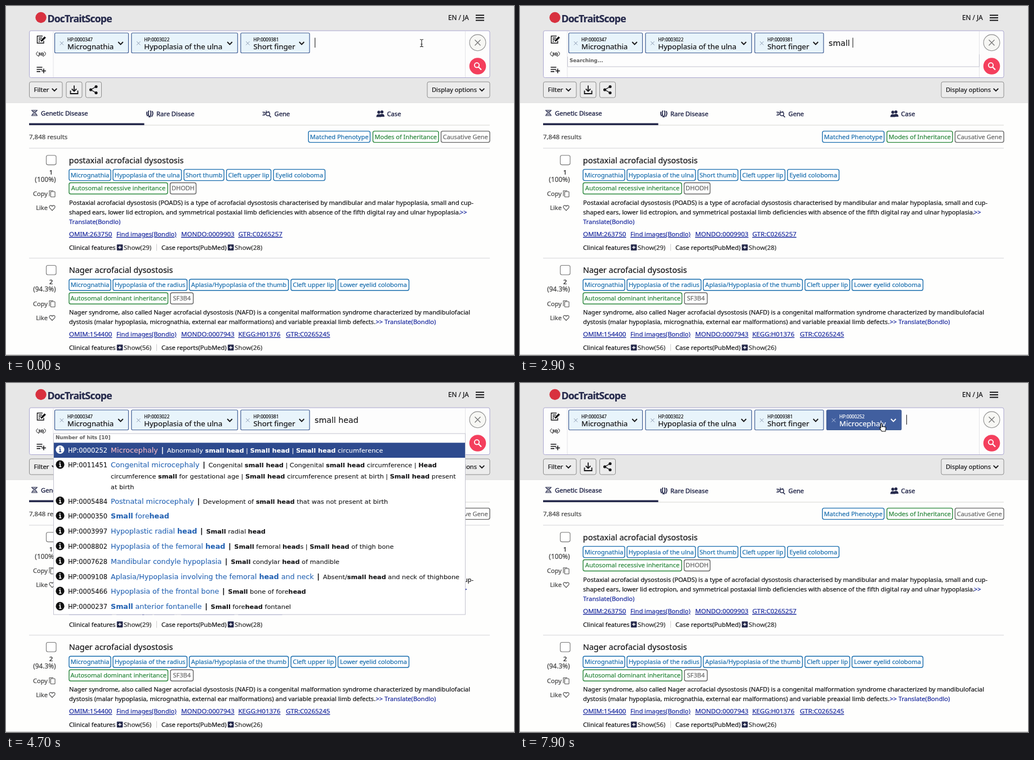
These frames come from a looping animation (902x621 px, 8 s). An HTML page:

```html
<!DOCTYPE html>
<html lang="en">
<head>
<meta charset="utf-8">
<title>Phenotype search</title>
<style>
  html, body { margin: 0; width: 100%; height: 100%; overflow: hidden; background: #fefefd; }
  svg { display: block; width: 100vw; height: 100vh; }
  text { font-family: "Noto Sans", sans-serif; white-space: pre; stroke-width: .22; }
  .v { font-family: "DejaVu Sans", Verdana, sans-serif; stroke-width: .1; }
  .b { font-weight: 700; }
  .m { stroke-width: .42; }
</style>
</head>
<body>
<svg id="stage" viewBox="0 0 902 621"></svg>
<script>
const INK = '#161618', NAVY = '#262a4c', LINK = '#1b2a9e';
const BLUE = '#1a6eae', GREEN = '#28863a', GRAY = '#666';

const text = (x, y, s, size = 11.07, fill = INK, extra = '') =>
  `<text x="${x}" y="${y}" font-size="${size}" fill="${fill}" stroke="${fill}" ${extra}>${s}</text>`;
const box = (x, y, x2, y2, fill, stroke = 'none', r = 0, sw = 1) =>
  `<rect x="${x}" y="${y}" width="${x2 - x}" height="${y2 - y}" rx="${r}" fill="${fill}" stroke="${stroke}" stroke-width="${sw}"/>`;
const line = (d, stroke = INK, sw = 1.5, fill = 'none') =>
  `<path d="${d}" fill="${fill}" stroke="${stroke}" stroke-width="${sw}"/>`;
const disc = (x, y, r, fill, stroke = 'none', sw = 1) =>
  `<circle cx="${x}" cy="${y}" r="${r}" fill="${fill}" stroke="${stroke}" stroke-width="${sw}"/>`;
const chevron = (x, y, c = INK) => line(`M${x - 4.3} ${y - 2.2}l4.3 4.3 4.3-4.3`, c, 1.9);
const cross = (x, y, r, c, sw = 1) =>
  line(`M${x - r} ${y - r}l${2 * r} ${2 * r}m0 ${-2 * r}l${-2 * r} ${2 * r}`, c, sw);
const group = (id, body) => `<g id="${id}">${body}</g>`;

function chip(x, x2, code, name, hot) {
  const ink = hot ? '#fff' : INK;
  return box(x, 48, x2, 83.5, hot ? '#415f9f' : '#e8f4fb', '#3f5d94', 2, 1.2) +
    cross(x + 12.5, 66.3, 3.2, hot ? '#b9c6e2' : '#8b9bb3') +
    text(x + 22.5, 62.8, code, 8, ink) +
    text(x + 22.5, 76.6, name, 13.2, ink) +
    chevron(x2 - 14, 66.2, ink);
}

function tag(s, x, x2, cy, color) {
  return box(x + .5, cy - 10, x2 - .5, cy + 10, '#fff', color, 3, 1.4) +
    text((x + x2) / 2, cy + 3.9, s, 11.02, color, 'text-anchor="middle"');
}

function header() {
  return box(0, 0, 902, 172, '#e7e7e7') + line('M0 172H902', '#dcdcdc', 1) +
    disc(62, 20.5, 9.7, '#d8313f') +
    text(73.5, 29, 'DocTraitScope', 17.6, NAVY, 'class="b" letter-spacing="-.8"') +
    text(785, 25, 'EN / JA', 11.8) +
    line('M834 16.5h15M834 21h15M834 25.5h15', INK, 1.9) +
    box(41.5, 44, 859, 127.5, '#fdfdfd', '#aaa6cf', 3) +
    line('M84 45V127M815.5 45V127', '#e3e3e8', 1) +
    // side tools
    line('M65 53.5H55.5V66H67V62M58 57h6M58 60h4M58 63h2', INK, 1.4) +
    line('M62 63l.6-2.4 6-6 1.8 1.8-6 6z', INK, 1, INK) +
    text(62.3, 87.8, '3D', 7.6, INK, 'class="b" text-anchor="middle"') +
    line('M57 81.5C52 83 53 88 59 89.6M67.5 81.5C72 83 71 88 65 89.6', INK, 1) +
    line('M54.5 109h10M54.5 112.8h10M54.5 116.6h6.5M67 111.5v8M63 115.5h8', INK, 1.6) +
    // clear and search
    disc(837.5, 65.3, 14.4, '#f7f7f4', '#8c8c8c', 1.1) + cross(837.5, 65.3, 5, '#777', 1.3) +
    disc(837.5, 107, 14.8, '#f43f5d') + disc(836, 105.3, 4.2, 'none', '#fff', 1.8) +
    line('M839 108.5l5 5', '#fff', 2.2) +
    // toolbar
    [[41.5, 100], [107, 135], [141.5, 169.5], [748, 859]]
      .map(([a, b]) => box(a, 135, b, 163, '#ececec', '#8d8d8d', 3)).join('') +
    text(49.5, 153, 'Filter', 11.4) + chevron(86, 149) +
    line('M114.5 150.5v5.5h13v-5.5M121 141.5v9M116.8 147.5l4.2 4.3 4.2-4.3', INK, 1.8) +
    line('M160 143.5l-9.5 5.5 9.5 5.5', INK, 1.4) +
    disc(160, 143.5, 2.6, INK) + disc(150.5, 149, 2.6, INK) + disc(160, 154.5, 2.6, INK) +
    text(756, 153, 'Display options', 11.1) + chevron(845, 149);
}

function tabs() {
  const label = (x, y, s) => text(x, y, s, 11.2, NAVY, 'class="m"');
  const person = (x, y, c) => disc(x, y - 3, 2.7, c) +
    line(`M${x - 4.5} ${y + 5.5}q0-5 4.5-5t4.5 5z`, 'none', 0, c);
  return line('M41 212H859', '#d6d6d2', 1) + box(41, 208.5, 245.5, 212, NAVY) +
    line('M46 185q0 3 4.5 5t4.5 5.5M55 185q0 3-4.5 5t-4.5 5.5M45 185.5h11M45 195h11M47.5 187.5h6M47.5 193h6', NAVY, 1.1) +
    label(62, 194.5, 'Genetic Disease') +
    line('M250.5 188q-1.5 4 1 8M253.5 186q-2 6 1 12M256.5 186q2 6-1 12M259.5 187q3 5-1 10', NAVY, 1.8) +
    label(267, 196, 'Rare Disease') +
    line('M455 189q4-1 7 2t5-4M455 194q4 1 6-2t1-6M458 188v7', NAVY, 1.2) +
    disc(465, 192, 3.3, '#fff', NAVY, 1.4) + line('M467 194.5l3.5 3.5', NAVY, 1.6) +
    label(476.5, 196, 'Gene') +
    person(667.5, 191.5, NAVY) + person(662, 192, NAVY) + label(676.5, 196, 'Case') +
    text(41, 236.6, '7,848 results', 11.45, '#444') +
    tag('Matched Phenotype', 536.5, 647, 232.6, BLUE) +
    tag('Modes of Inheritance', 651, 768.5, 232.6, GREEN) +
    tag('Causative Gene', 772, 859.5, 232.6, GRAY);
}

// One result; y is the centre of its title.
function result(y, r) {
  const links = y + r.linkDy, end = links + 23.5;
  const plus = x => box(x, end - 9.3, x + 10.6, end + 1.4, NAVY, 'none', 1) +
    line(`M${x + 2.5} ${end - 4}h5.6m-2.8-2.8v5.6`, '#fff', 1.4);
  const right = (dy, s, x = 88.5, size = 11.07) => text(x, y + dy, s, size, '#444', 'text-anchor="end"');
  return line(`M41 ${y - 21.3}H859`, '#d4d4d8', 1) +
    box(71.5, y - 8.5, 89, y + 8.3, '#fff', '#777', 3, 1.1) +
    text(80, y + 25.3, r.rank, 11.4, INK, 'text-anchor="middle"') +
    right(38.3, r.score, 88.5, 11.8) + right(63.5, 'Copy', 74) + right(88.8, 'Like', 74) +
    line(`M77 ${y + 64}v-9.5h7`, '#555', 1.1) + box(79.3, y + 56, 87, y + 65.5, 'none', '#555', 1, 1.1) +
    line(`M82 ${y + 89.5}l-4.3-4.4c-2.5-3.5 2-6.5 4.3-3 2.3-3.5 6.8-.5 4.3 3z`, '#555', 1.2) +
    text(111.8, y + 5.3, r.title, 14.43) +
    r.tags.map(t => tag(...t, y + 26.3, BLUE)).join('') +
    tag(...r.mode, y + 50.2, GREEN) + tag(...r.gene, y + 50.2, GRAY) +
    r.lines.map((s, i) => text(112, y + 79.2 + 17.2 * i, s)).join('') +
    r.more.map(([x, i, s]) => text(x, y + 79.2 + 17.2 * i, s, 11.07, LINK)).join('') +
    r.links.map(([x, s]) =>
      text(x, links, s, /\d/.test(s) ? 11.5 : 11.07, LINK, 'text-decoration="underline"')).join('') +
    text(112, end, 'Clinical features') + plus(196.8) + text(209, end, `Show(${r.features})`, 11.5, '#333') +
    line(`M267.5 ${end - 10}v12`, '#ccc', 1) +
    text(276, end, 'Case reports(PubMed)') + plus(393.8) + text(406, end, `Show(${r.reports})`, 11.5, '#333');
}

const first = {
  rank: 1, score: '(100%)', title: 'postaxial acrofacial dysostosis', linkDy: 135.7,
  tags: [['Micrognathia', 111.5, 186.5], ['Hypoplasia of the ulna', 189.5, 312], ['Short thumb', 315.5, 387.5],
    ['Cleft upper lip', 391, 471], ['Eyelid coloboma', 474.5, 567]],
  mode: ['Autosomal recessive inheritance', 111.5, 287.5], gene: ['DHODH', 291, 338],
  lines: ['Postaxial acrofacial dysostosis (POADS) is a type of acrofacial dysostosis characterised by mandibular and malar hypoplasia, small and cup-',
    'shaped ears, lower lid ectropion, and symmetrical postaxial limb deficiencies with absence of the fifth digital ray and ulnar hypoplasia.'],
  more: [[806, 1, '&gt;&gt;'], [112, 2, 'Translate(Bondlo)']],
  links: [[112, 'OMIM:263750'], [196, 'Find images(Bondlo)'], [311, 'MONDO:0009903'], [412.5, 'GTR:C0265257']],
  features: 29, reports: 28
};
const second = {
  rank: 2, score: '(94.3%)', title: 'Nager acrofacial dysostosis', linkDy: 118.2,
  tags: [['Micrognathia', 111.5, 186.5], ['Hypoplasia of the radius', 189.5, 322], ['Aplasia/Hypoplasia of the thumb', 325, 502],
    ['Cleft upper lip', 505.5, 586], ['Lower eyelid coloboma', 589, 716]],
  mode: ['Autosomal dominant inheritance', 111.5, 288], gene: ['SF3B4', 291.5, 333],
  lines: ['Nager syndrome, also called Nager acrofacial dysostosis (NAFD) is a congenital malformation syndrome characterized by mandibulofacial',
    'dystosis (malar hypoplasia, micrognathia, external ear malformations) and variable preaxial limb defects.'],
  more: [[656.5, 1, '&gt;&gt; Translate(Bondlo)']],
  links: [[112, 'OMIM:154400'], [196, 'Find images(Bondlo)'], [311, 'MONDO:0007943'], [412.5, 'KEGG:H01376'], [497, 'GTR:C0265245']],
  features: 56, reports: 26
};

// *word* marks bold text.
const rich = s => s.replace(/\*(.+?)\*/g, '<tspan class="b">$1</tspan>');
const hits = [
  [119.3, '0000252', 'Microcephaly', 'Abnormally *small head* | *Small head* | *Small head* circumference'],
  [146, '0011451', 'Congenital microcephaly', 'Congenital *small head* | Congenital *small head* circumference | *Head*',
    'circumference *small* for gestational age | *Small head* circumference present at birth | *Small head* present', 'at birth'],
  [210.3, '0005484', 'Postnatal microcephaly', 'Development of *small head* that was not present at birth'],
  [237, '0000350', '*Small* fore*head*'],
  [264, '0003997', 'Hypoplastic radial *head*', '*Small* radial *head*'],
  [290.8, '0008802', 'Hypoplasia of the femoral *head*', '*Small* femoral *head*s | *Small head* of thigh bone'],
  [317.5, '0007628', 'Mandibular condyle hypoplasia', '*Small* condylar *head* of mandible'],
  [344.3, '0009108', 'Aplasia/Hypoplasia involving the femoral *head* and neck', 'Absent/*small head* and neck of thighbone'],
  [371, '0005466', 'Hypoplasia of the frontal bone', '*Small* bone of fore*head*'],
  [398, '0000237', '*Small* anterior fontanelle', '*Small* fore*head* fontanel']
];

function hitRow([y, code, name, note, ...rest], i) {
  const ink = i ? INK : '#fff', tint = i ? '#2563b3' : '#f6b9c4', base = y + 4.2;
  const tail = note ? `<tspan class="b" dx="1.3"> | </tspan><tspan dx="1.3" font-size="11.27">${rich(note)}</tspan>` : '';
  return disc(96, y - .8, 7.6, i ? '#111' : '#fff') +
    line(`M94.3 ${y - 1.8}h2v4.8m-2 0h4M95.8 ${y - 5.8}v2`, i ? '#fff' : '#2d4a8e', 1.7) +
    text(110, base, 'HP:' + code, 11.4, ink, 'class="v"') +
    text(186, base, `<tspan fill="${tint}" stroke="${tint}">${rich(name)}</tspan>${tail}`, 12.68, ink, 'class="v"') +
    rest.map((s, k) => text(186, base + 19.4 * (k + 1), rich(s), 11.27, ink, 'class="v"')).join('');
}

const stage = document.getElementById('stage');
const note = s => text(88, 100.2, s, 8.8, '#666', 'class="v b"');
stage.innerHTML =
  box(0, 0, 902, 621, '#fefefd') + header() + tabs() + result(274.3, first) + result(470, second) +
  line('M0 620.5H902', '#c4c4c4', 1) +
  chip(86.5, 217.5, 'HP:0000347', 'Micrognathia') +
  chip(222.8, 411.3, 'HP:0003022', 'Hypoplasia of the ulna') +
  chip(416.8, 539, 'HP:0009381', 'Short finger') +
  group('cold', chip(544.5, 677, 'HP:0000252', 'Microcephaly')) +
  group('hot', chip(544.5, 677, 'HP:0000252', 'Microcephaly', true)) +
  group('busy', line('M84.5 90V108H815.5V86', '#c3c3cf', 1) + note('Searching...')) +
  group('list', box(84.5, 90, 815.5, 412, '#fff', '#c3c3cf') +
    box(85, 106.3, 815, 133, '#2d4a8e') + note('Number of hits [10]') + hits.map(hitRow).join('')) +
  text(548, 70.5, '', 14.2, INK, 'id="query" class="v"') +
  group('caret', line('M0 56.5V74', '#222', 1.1)) +
  group('beam', line('M-3-6.5q3 0 3 1.5v10q0 1.5-3 1.5M3-6.5q-3 0-3 1.5v10q0 1.5 3 1.5M-1.5 2h3', '#222', 1.1)) +
  group('hand', line('M-2.5-6.5c0-2 2.4-2 2.4 0v4.5l1.6-.8 1 .8 1.5-.5 1 .9c1.6-.5 1.8.6 1.6 2.2l-.8 5.4h-6.3l-3.6-5c-.8-1.7.8-2 1.6-1z', '#111', 1.1, '#fff'));

const ui = {};
for (const id of ['cold', 'hot', 'busy', 'list', 'query', 'caret', 'beam', 'hand']) ui[id] = document.getElementById(id);
const show = (id, on) => ui[id].setAttribute('display', on ? 'inline' : 'none');
const move = (id, x, y = 0) => ui[id].setAttribute('transform', `translate(${x} ${y})`);

const LOOP = 8000, PHRASE = 'small head', HITS = 4400, PICK = 5900, MOVE = 7300, ARRIVE = 7900;
const keys = [1000, 1200, 1400, 1600, 1800, 2800, 3050, 3300, 3550, 3800];
const resets = [0, ...keys, PICK];

function draw(t) {
  const picked = t >= PICK;
  const typed = picked ? '' : PHRASE.slice(0, keys.filter(k => k <= t).length);
  ui.query.textContent = typed.replace(' ', '\u00a0');
  show('busy', typed && t < HITS);
  show('list', t >= HITS && !picked);

  // the blink restarts at every key press
  const since = t - resets.filter(k => k <= t).pop();
  show('caret', since % 1000 < 500);
  move('caret', picked ? 686.5 : 548.7 + (typed ? ui.query.getComputedTextLength() : 0));

  const p = Math.min(1, Math.max(0, (t - MOVE) / (ARRIVE - MOVE))) ** 1.5;
  const x = 738 - 95 * p, y = 66 + 14 * p, hover = picked && x < 677;
  show('cold', picked && !hover);
  show('hot', hover);
  show('beam', t < keys[0] || (t >= MOVE && !hover));
  show('hand', hover);
  move('beam', x, y);
  move('hand', x, y);
}

(function tick() {
  draw(performance.now() % LOOP);
  requestAnimationFrame(tick);
})();
</script>
</body>
</html>
```
